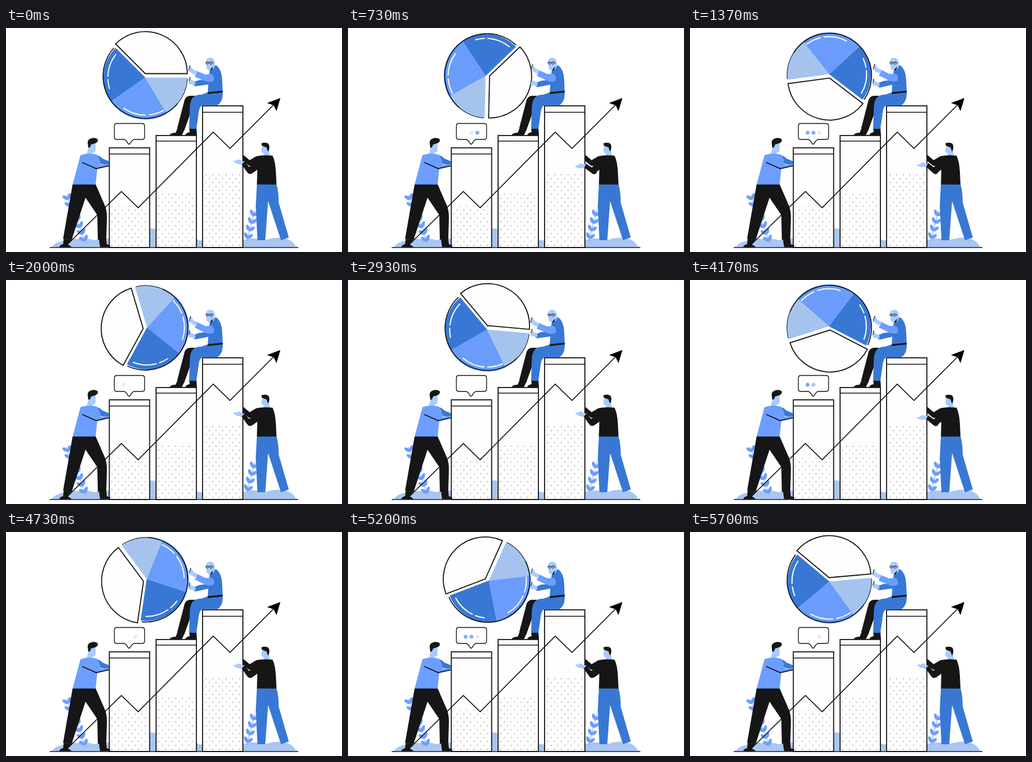
An HTML page for the animation above (5.73 s loop, 600x400 px).

```html
<!DOCTYPE html>
<html lang="en">
<head>
<meta charset="utf-8">
<title>Team and charts</title>
<style>
  html, body { margin: 0; width: 100%; height: 100%; overflow: hidden; background: #fff; }
  svg { display: block; width: 100vw; height: 100vh; }
  .ink { fill: #161616; }
  .deep { fill: #3878d4; }
  .mid { fill: #6c9eff; }
  .pale { fill: #a9c6f0; }
  .skin { fill: #a8cbff; }
  .line { fill: none; stroke: #111; stroke-width: 1.7; }
  .thin { fill: none; stroke: #111; stroke-width: 1; }
  .fine { fill: none; stroke: #111; stroke-width: .7; }
  .box { fill: #fefefe; stroke: #111; stroke-width: 1.8; }
  .shine { fill: none; stroke: #fff; stroke-width: 2; stroke-linecap: round; }
</style>
</head>
<body>
<svg viewBox="0 0 600 400" xmlns="http://www.w3.org/2000/svg">
  <defs>
    <pattern id="barDots" width="12" height="14" patternUnits="userSpaceOnUse">
      <circle cx="3" cy="3" r=".85" fill="#777"/>
      <circle cx="9" cy="10" r=".85" fill="#777"/>
    </pattern>
    <pattern id="pieDots" width="6" height="6" patternUnits="userSpaceOnUse">
      <circle cx="1.5" cy="1.5" r=".6" fill="#3d68ae" opacity=".6"/>
      <circle cx="4.5" cy="4.5" r=".6" fill="#3d68ae" opacity=".6"/>
    </pattern>
  </defs>

  <!-- ground and plants -->
  <path class="pale" d="M82 391Q88 382 102 380Q113 373 126 377Q140 373 158 379Q172 374 184 376Q225 358 262 358Q310 364 345 379Q390 382 425 378Q445 373 462 379Q482 372 500 376Q513 380 518 391Z"/>
  <g id="plants"></g>

  <g id="bars"></g>
  <path class="thin" d="M78 392H522" style="stroke-width:1.5"/>

  <!-- pie -->
  <g id="pie"></g>

  <!-- speech bubble -->
  <path d="M198 170.5H243Q247.500 170.500 247.500 175V194.500Q247.500 199 243 199H228Q224.500 201 221.500 206.500Q220 208.500 218 206.500Q215 200 211 199H198Q193.500 199 193.500 194.500V175Q193.500 170.500 198 170.500Z" fill="#fff" stroke="#111" stroke-width="1.4"/>
  <g id="typing"></g>

  <!-- seated man -->
  <g>
    <path class="ink" d="M337 121H329Q322 121 319 128L306 178L318 184L329 153L344 134Z"/>
    <path class="ink" d="M307 177L318 183L314 191.500H292Q294 187 303 187Z"/>
    <path class="ink" d="M327 178H340L341 191.500H320Q321 187 328 186Z"/>
    <path class="deep" d="M360 115L387 113Q388 130 379 137Q374 139 362 138.500H350Q345 141 344 152L340 180H327L328 147Q328 130 334 124Q338 119 349 119Z"/>
    <path class="deep" d="M364 73Q368 66 376 67Q385 74 386 92L387 114L360 117L362 92Z"/>
    <path class="ink" d="M361 114.500L387 112V115L360 118Z"/>
    <g id="lowArm">
      <path class="deep" d="M366 92L345 93L333 97Q333 102 338 104L360 101L369 100Z"/>
      <path class="skin" d="M338 95L332 93L329 88Q326 86 327 91L326 98Q328 102 332 100L338 102Z"/>
      <path class="thin" d="M329 87L326.500 95"/>
    </g>
    <g id="topArm">
      <path class="mid" d="M341 77L356 83L367 82Q373 86 371 94Q365 98 356 95L337 87Z"/>
      <path class="skin" d="M342 77L334 74L329 67Q326 66 327 71L326 77Q331 81 337 83Z"/>
      <path class="thin" d="M328.500 67L326 76"/>
    </g>
    <path class="skin" d="M357 61Q357 53 365 53Q373 54 373 63Q373 69 371 73L364 76Q358 75 358 69Z"/>
    <path class="ink" d="M365 74L370 69L369 73L366 77Z"/>
    <path class="fine" d="M356 62H371"/>
    <circle class="fine" cx="359.500" cy="62.500" r="2.200"/>
    <circle class="fine" cx="366" cy="62.500" r="2.500"/>
  </g>

  <!-- left man -->
  <g>
    <path class="ink" d="M119 279H160L177 318Q181 328 180 346L179 378H164L163 334L142 303L117 379L102 376Z"/>
    <path class="ink" d="M103 376L117 379L110 386L118 391.500H95Q96 387 102 386Z"/>
    <path class="ink" d="M166 377H179L180 386L186 388V391.500H168Z"/>
    <path class="skin" d="M149 207L160 206V218Q160 222 154 223L155 228L143 228L147 215Z"/>
    <path class="ink" d="M146 207Q145 200 150 198Q155 195 161 197L164 199Q165 204 159 206L152 208L150 213L147 214Z"/>
    <path class="deep" d="M160 227Q167 227 172 233L184 238V245L166 242Z"/>
    <path class="mid" d="M133 227Q147 222 162 226Q168 232 169 244L184 243V247L163 252L160 279.500H119Z"/>
    <path class="line" d="M136 240L161 251L184 246"/>
  </g>

  <!-- right man -->
  <g>
    <path class="deep" d="M448 279H483Q487 292 487 312L505 374L491 379L468 309L463 379H449L446 318Z"/>
    <path class="skin" d="M457 212L467 211L469 219L472 229H459L461 224Q457 224 456 219Z"/>
    <path class="ink" d="M456 206Q464 203 469 207Q472 214 468 221L465 213L457 210.500Z"/>
    <path class="ink" d="M423 226L435 236L447 229Q460 226 476 228Q481 238 482 258L483 279.500H448L449 247L434 246L423 237Z"/>
    <g id="hand">
      <path class="skin" d="M426 244L419 244L411 242L406 238Q406 235 411 237L414 235Q418 234 421 238L427 238Z"/>
      <path class="ink" d="M426 238L434 248L441 244L447 251L438 260Q434 262 431 258L421 244Z"/>
    </g>
    <path class="ink" d="M448 236L456 248L439 260L433 253Z"/>
  </g>

  <!-- trend arrow -->
  <path class="line" d="M106 390L206 292L236 321L370 186L400 215L481 134"/>
  <path d="M490 125L483 148.500L478 138L466 134Z"/>
</svg>

<script>
const LOOP = 5730;
const TICKS = [70, 100, 130, 170];   // steps inside each 200 ms
const TURN = 72;                     // steps per full cycle
const R = 75, CX = 248.8, CY = 85.5;
const $ = id => document.getElementById(id);
const rad = a => a * Math.PI / 180;

function add(parent, tag, attrs) {
  const el = document.createElementNS('http://www.w3.org/2000/svg', tag);
  for (const key in attrs) el.setAttribute(key, attrs[key]);
  parent.appendChild(el);
  return el;
}

function arc(x, y, r, from, to) {
  const p = a => `${x + r * Math.cos(rad(a))} ${y + r * Math.sin(rad(a))}`;
  return `M${p(from)}A${r} ${r} 0 ${to - from > 180 ? 1 : 0} 1 ${p(to)}`;
}
const wedge = (x, y, from, to) => `${arc(x, y, R, from, to)}L${x} ${y}Z`;

// left, top, header line, first row of dots
for (const [x, y, head, dots] of [[184.5, 214, 225, 318], [268, 192, 202, 291], [351, 139, 150.5, 260]]) {
  const g = $('bars');
  add(g, 'rect', { x, y, width: 72, height: 392 - y, class: 'box' });
  add(g, 'rect', { x: x + 2, y: dots, width: 68, height: 390 - dots, fill: 'url(#barDots)' });
  add(g, 'path', { d: `M${x} ${head}h72`, class: 'line' });
}

// stem base, stem tip, pairs of leaves
for (const [x0, y0, x1, y1, pairs] of [[142, 384, 125, 336, 4], [116, 322, 108, 298, 2], [430, 380, 444, 326, 4]]) {
  const g = $('plants');
  add(g, 'path', { d: `M${x0} ${y0}L${x1} ${y1}`, stroke: '#6c9eff', fill: 'none' });
  const lean = Math.atan2(x1 - x0, y0 - y1) * 180 / Math.PI;
  for (let i = 0; i < pairs; i++) {
    const f = (i + .3) / pairs, x = x0 + (x1 - x0) * f, y = y0 + (y1 - y0) * f;
    for (const side of [-1, 1]) {
      add(g, 'ellipse', { cx: 0, cy: -6, rx: 3, ry: 6, class: 'mid',
        transform: `translate(${x} ${y}) rotate(${lean + side * 38})` });
    }
  }
}

const pie = $('pie');
for (const [from, to, fill, dotted] of [[145, 225, 'deep', 0], [59, 145, 'mid', 1], [0, 59, 'pale', 1]]) {
  const d = wedge(0, 3, from, to);
  add(pie, 'path', { d, class: fill });
  if (dotted) add(pie, 'path', { d, fill: 'url(#pieDots)' });
}
add(pie, 'path', { d: arc(0, .5, 75.5, 40, 222), class: 'line' });
add(pie, 'path', { d: arc(0, .5, 75.5, 3, 40), class: 'thin' });
for (const [from, to] of [[182, 218], [163, 177], [90, 125], [61, 84]]) {
  add(pie, 'path', { d: arc(0, 3, 67, from, to), class: 'shine' });
}
add(pie, 'path', { d: wedge(0, -4, 225, 360), class: 'box' });

const dots = [210, 220.5, 231].map(cx => add($('typing'), 'circle', { cx, cy: 187, r: 3.5, fill: '#78a6ec' }));

function draw(step) {
  const k = step % TURN;
  pie.setAttribute('transform', `translate(${CX} ${CY}) rotate(${k / (TURN - 1) * 360})`);

  dots.forEach((dot, i) => {
    const p = (k % 24 - 1 - i * 4) / 14;
    dot.setAttribute('opacity', p > 0 && p < 1 ? Math.sin(Math.PI * p) : 0);
  });

  const push = Math.sin(Math.PI * k / (TURN - 1));
  $('topArm').setAttribute('transform', `rotate(${push * 4} 370 90)`);
  $('lowArm').setAttribute('transform', `rotate(${-push * 5} 366 97)`);

  const dip = k < 48 ? (1 - Math.cos(2 * Math.PI * k / 48)) / 2 : 0;
  $('hand').setAttribute('transform', `translate(${dip * 4} 0) rotate(${-dip * 21} 437 254)`);
}

const start = performance.now();
function frame() {
  const t = Math.max(0, performance.now() - start) % LOOP;
  const within = t % 200;
  draw(5 * Math.floor(t / 200) + TICKS.filter(at => within >= at).length);
  requestAnimationFrame(frame);
}
frame();
</script>
</body>
</html>
```
